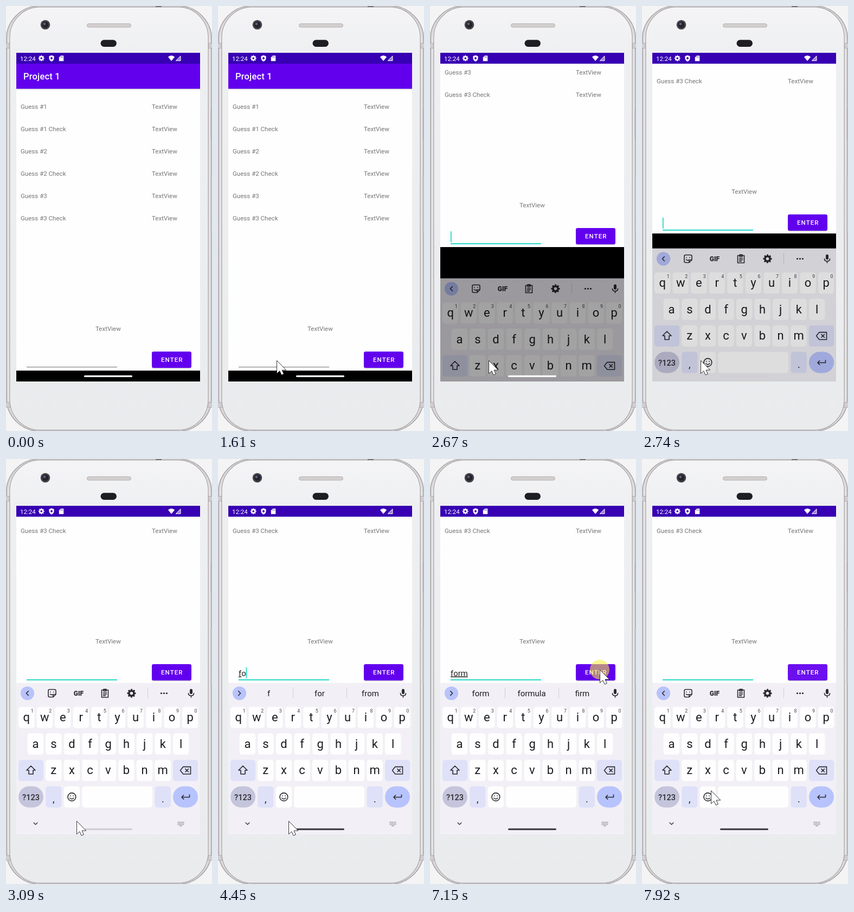
Recreate the animation shown at these times as an HTML page. Size 380x781 px, loop 7.99 s.

```html
<!DOCTYPE html>
<html lang="en">
<head>
<meta charset="utf-8">
<title>Guess the word</title>
<style>
  html, body { margin: 0; width: 100%; height: 100%; overflow: hidden; background: #f5f4f5; }
  svg { display: block; width: 100vw; height: 100vh; font-family: Roboto, sans-serif; }
  text { white-space: pre; }
  .label { font-size: 11.55px; fill: #757575; }
  .key { font-size: 22px; fill: #1c1b20; text-anchor: middle; }
  .hint { font-size: 9px; fill: #46464f; text-anchor: middle; }
  .word { font-size: 15px; fill: #1c1b20; text-anchor: middle; }
  .icon { fill: none; stroke: #2a2a30; stroke-width: 1.6; stroke-linecap: round; stroke-linejoin: round; }
</style>
</head>
<body>
<svg id="stage" viewBox="0 0 380 781" preserveAspectRatio="none"></svg>
<script>
const LOOP = 7990;
const stage = document.getElementById('stage');

const rect = (x, y, w, h, fill, r = 0, extra = '') =>
  `<rect x="${x}" y="${y}" width="${w}" height="${h}" rx="${r}" fill="${fill}" ${extra}/>`;
const circle = (x, y, r, fill, extra = '') => `<circle cx="${x}" cy="${y}" r="${r}" fill="${fill}" ${extra}/>`;
const text = (x, y, cls, s, extra = '') => `<text x="${x}" y="${y}" class="${cls}" ${extra}>${s}</text>`;
const icon = (x, y, d, extra = '') => `<path class="icon" transform="translate(${x} ${y})" d="${d}" ${extra}/>`;
const group = (id, body, extra = '') => `<g id="${id}" ${extra}>${body}</g>`;
const gear = (x, y, r, color) =>
  circle(x, y, r * .57, 'none', `stroke="${color}" stroke-width="${r * .45}"`) +
  circle(x, y, r * .83, 'none', `stroke="${color}" stroke-width="${r * .34}" pathLength="16" stroke-dasharray="1.1 .9" stroke-dashoffset=".5"`);

function phone() {
  const shell = (x, y, w, h, r, fill, stroke, sw) => rect(x, y, w, h, fill, r, `stroke="${stroke}" stroke-width="${sw}"`);
  const bands = [[0, 68], [0, 728], [372, 68], [372, 728]]
    .map(([x, y]) => rect(x, y, 8, 10, '#d2cdd0') + rect(x, y, 8, 1, '#b3aeb1') + rect(x, y + 9, 8, 1, '#b3aeb1')).join('');
  return `<defs>
      <linearGradient id="body" x2="0" y2="1"><stop stop-color="#f4f4f6"/><stop offset=".12" stop-color="#eeeff1"/><stop offset="1" stop-color="#e9ebed"/></linearGradient>
      <clipPath id="window">${rect(19, 106, 339, 584, '#000')}</clipPath>
    </defs>` +
    shell(.5, -.5, 379, 782, 62, '#e2dfe1', '#989396', 1.2) +
    shell(3, .8, 374, 779.5, 59, '#eceaec', '#c4c0c3', 1) +
    bands +
    shell(6.8, 1.8, 366.4, 777.5, 56, 'url(#body)', '#a5a0a3', 1.3) +
    rect(276, 0, 11, 2, '#77747a') +
    rect(378, 190, 2, 54, '#b5b1b4') + rect(378, 311, 2, 105, '#c0bcbf') +
    circle(72.5, 34.5, 8.8, '#48464c') + circle(72.5, 34.5, 6, '#242329') + circle(71, 33, 2.4, '#55607a') +
    rect(149.5, 32.5, 81, 6.5, '#d3cfcf', 3.2, 'stroke="#b5b0b0"') +
    rect(174.5, 62.3, 29.5, 12.6, '#1e1d23', 6.3);
}

function statusBar() {
  return rect(19, 86, 339, 20, '#3700b3') +
    `<text x="26" y="100.5" font-size="11.55" fill="#fff">12:24</text>` +
    gear(65.3, 96, 5.4, '#fff') +
    `<path d="M84 90.5L88.6 92.3V96Q88.4 100 84 102Q79.6 100 79.4 96V92.3Z" fill="#fff"/>
     <path d="M84 93.6L86.5 96L84 98.6L81.5 96Z" fill="#3700b3"/>
     <path d="M101 91.2H106.3V101.3H97.8V94.4Z" fill="#fff"/>
     <path d="M100.8 92.8V94.6M102.6 92.8V94.6M104.4 92.8V94.6" stroke="#3700b3" stroke-width=".8"/>
     <path d="M299 93.6Q305 88.4 311.2 93.6L305.1 101Z" fill="#fff"/>
     <path d="M313.2 100.6L322 91.8V100.6Z" fill="#9b80d9" stroke="#fff" stroke-width="1"/>`;
}

function app() {
  let rows = '';
  for (let i = 0; i < 6; i++) {
    const y = 189.1 + 41 * i;
    rows += text(27, y, 'label', `Guess #${(i >> 1) + 1}${i % 2 ? ' Check' : ''}`) + text(269, y, 'label', 'TextView');
  }
  return rect(19, 152, 339, 518, '#fefefe') +
    rect(19, 152, 339, 2.5, '#ebe9ee') + rect(19, 152, 339, 1, '#d3cfda') +
    rect(19, 106, 339, 46, '#6200ee') +
    `<text x="32" y="135" font-size="16.5" font-weight="500" letter-spacing=".2" fill="#fff">Project 1</text>` +
    rows + text(165, 596.7, 'label', 'TextView') +
    rect(38, 663, 167, 1, '#707070', 0, 'id="idleLine"') +
    rect(38, 662.9, 167, 1.8, '#12d3c3', 0, 'id="focusLine"') +
    `<text id="field" x="38" y="656.6" font-size="14.85" fill="#212121"><tspan id="composed" text-decoration="underline"></tspan><tspan id="fresh"></tspan></text>` +
    rect(38, 641, 1.6, 20, '#12d3c3', 0, 'id="caret"') +
    rect(269, 636, 73, 30.5, '#000', 3.5, 'opacity=".15"') +
    rect(269, 635, 73, 30, '#6200ee', 3.3) +
    rect(269, 635, 73, 30, '#fff', 3.3, 'id="ripple"') +
    `<text x="286" y="654.4" font-size="11.55" font-weight="500" letter-spacing="1.03" fill="#fff">ENTER</text>`;
}

function keyboard() {
  const PITCH = 33.55, SOFT = '#dee1f8';
  const key = (x, y, w = 29.3, fill = '#fefefe', r = 5) => rect(x, y - .2, w, 39, fill, r);
  const row = (letters, x0, y, hints) => [...letters].map((c, i) => {
    const x = x0 + PITCH * i;
    return key(x - 14.65, y) + text(x, y + 26.3, 'key', c) +
      (hints ? text(x + 10.5, y + 10.3, 'hint', (i + 1) % 10) : '');
  }).join('');
  const divider = x => rect(x, 420, 1, 20, '#cfcdd6');

  const tools =
    icon(39.5, 430.5, 'M1.8 -4L-2 0L1.8 4') +
    icon(85, 430.5, 'M-4.5 -7H4.5Q7 -7 7 -4.5V2L2 7H-4.5Q-7 7 -7 4.5V-4.5Q-7 -7 -4.5 -7ZM7 2H4Q2 2 2 4V7M-3 -2.5V-2M3 -2.5V-2M-3.5 1.5Q-1 4 1.5 2') +
    `<text x="134" y="434.8" font-size="12" font-weight="900" fill="#2a2a30" text-anchor="middle">GIF</text>` +
    icon(182.5, 430.5, 'M-6 -6H6V7.5H-6ZM-2.5 -7.5H2.5V-4H-2.5ZM-3 -1H3M-3 1.7H3M-3 4.4H1') +
    gear(231.5, 430.5, 8, '#2a2a30') + divider(261) +
    [-5, 0, 5].map(d => circle(291.5 + d, 430.5, 1.6, '#2a2a30')).join('');
  const words = icon(39.5, 430.5, 'M-1.8 -4L2 0L-1.8 4') + divider(138) + divider(237) +
    [93.5, 187.5, 281].map(x => text(x, 436, 'word', '')).join('');

  return rect(19, 411.5, 339, 370, '#f2f0f6') +
    circle(39.5, 430.5, 12.6, '#b8c3fb') + group('tools', tools) + group('words', words) +
    rect(339, 422.5, 5, 9.5, '#2a2a30', 2.5) + icon(341.5, 430.5, 'M-5 0Q-5 4.5 0 4.5Q5 4.5 5 0M0 4.5V7.5') +
    row('qwertyuiop', 37.7, 455.7, true) +
    row('asdfghjkl', 54.4, 504.3) +
    key(23, 553, 46, SOFT) + icon(46, 572, 'M0 -8L8 0H4V7H-4V0H-8Z') +
    row('zxcvbnm', 87.8, 553) +
    key(308, 553, 46, SOFT) + icon(331, 572.3, 'M-4 -6.7H9.5V6.7H-4L-9.5 0ZM0 -2.7L5.4 2.7M5.4 -2.7L0 2.7') +
    key(23, 601.7, 46, '#c4c5dc', 19.5) +
    `<text x="46" y="626.5" font-size="14.5" font-weight="500" fill="#2a2a30" text-anchor="middle">?123</text>` +
    key(73.2, 601.7, 29.3, SOFT) + text(87.8, 631, 'key', ',', 'style="font-size:18px"') +
    key(106.7, 601.7) + circle(121.4, 621, 7.4, 'none', 'stroke="#2a2a30" stroke-width="1.6"') +
    icon(121.4, 621, 'M-2.7 -2.2V-1.8M2.7 -2.2V-1.8M-3.6 2Q0 5.6 3.6 2') +
    key(140.2, 601.7, 129.8) +
    key(274.6, 601.7, 29.3, SOFT) + text(289.3, 631, 'key', '.', 'style="font-size:18px"') +
    key(308, 601.7, 46, '#b7c3fc', 19.5) + icon(331, 621.5, 'M7.5 -4.5V0H-7M-3.3 -3.7L-7 0L-3.3 3.7') +
    icon(54.5, 670, 'M-3.5 -1.7L0 1.7L3.5 -1.7', 'style="stroke-width:1.2"') +
    [-2.2, 0, 2.2].map(d => `<path d="M316.5 ${669.5 + d}H328.5" stroke="#77767e" stroke-width="1.2" stroke-dasharray="1.3 .8"/>`).join('') +
    `<path d="M320 674.2H325" stroke="#77767e"/>`;
}

stage.innerHTML = phone() + rect(19, 106, 339, 584, '#000') +
  `<g clip-path="url(#window)">${group('app', app())}${group('keyboard', keyboard())}</g>` +
  statusBar() + rect(144, 678.7, 89, 3.2, '#fff', 1.6, 'id="pill"') +
  circle(0, 0, 18, '#f6f03c', 'id="click" opacity=".56"') +
  `<path id="mouse" d="M.5 .5V24.4L5.8 19.6L9.2 27L13.4 25.2L10 18H17.8Z" fill="#fff" stroke="#222" stroke-width=".9"/>`;

const el = {};
stage.querySelectorAll('[id]').forEach(node => el[node.id] = node);
const wordSlots = el.words.querySelectorAll('text');

const show = (node, on) => node.setAttribute('visibility', on ? 'visible' : 'hidden');
const move = (node, x, y) => node.setAttribute('transform', `translate(${x} ${y})`);
const within = (t, spans) => spans.some(([a, b]) => t >= a && t < b);
// Last entry whose time has passed.
const latest = (t, list) => list.reduce((found, item) => t >= item[0] ? item : found, list[0]);

const easeOut = u => 1 - (1 - u) ** 2;
const easeBoth = u => u * u * (3 - 2 * u);

// Mouse strokes: quadratic curves drawn in a fixed number of jumps.
const strokes = [
  { from: 840, to: 1610, jumps: 11, x: [308, 200, 108], y: [754, 545, 651], ease: easeOut },
  { from: 2740, to: 3090, jumps: 5, x: [108, 121, 130], y: [651, 660, 665], ease: easeOut },
  { from: 5800, to: 6480, jumps: 9, x: [143, 375, 318], y: [639, 242, 378], ease: easeBoth },
  { from: 6680, to: 6880, jumps: 2, x: [318, 315, 313], y: [378, 383, 387], ease: easeOut },
  { from: 7360, to: 7920, jumps: 8, x: [313, 245, 127], y: [387, 480, 609], ease: easeBoth },
];
function mouseAt(t) {
  const s = strokes.filter(s => t >= s.from).pop();
  if (!s) return null;
  const u = s.ease(Math.min(s.jumps, Math.floor((t - s.from) / (s.to - s.from) * s.jumps + 1e-6)) / s.jumps);
  const curve = ([a, b, c]) => (1 - u) ** 2 * a + 2 * u * (1 - u) * b + u * u * c;
  return [curve(s.x), curve(s.y)];
}

// [time, app shift, keyboard shift, keyboard opacity]
const slide = [[0, 0, 280, 0], [2600, -104, 200, 0], [2670, -227, 89, .64],
  [2740, -252, 34, .87], [2810, -258, 8, .98], [2880, -258, 0, 1]];
// [time, composed text, fresh text]
const typing = [[0, '', ''], [3960, '', 'f'], [4100, 'f', ''], [4450, 'f', 'o'], [4520, 'fo', ''],
  [4590, 'fo', 'r'], [4730, 'for', ''], [5130, 'for', 'm'], [5400, 'form', ''], [7360, '', '']];
const suggestions = [[0, ''], [4170, 'f for from'], [4520, 'fo for following'],
  [4800, 'for form forum'], [5400, 'form formula firm'], [7430, '']];
const caretOn = [[2270, 2770], [3290, 3820], [3960, 5870], [6330, 6820], [7360, 7850]];
const clicks = [[2070, 2220], [7150, 7290]];

function pillColor(t) {
  if (t < 2740) return '#fff';
  const u = Math.min(1, Math.max(0, (t - 3220) / 1020));
  const mix = (a, b) => Math.round(a + (b - a) * u);
  return `rgb(${mix(208, 68)},${mix(206, 66)},${mix(212, 72)})`;
}

function render(t) {
  const [, appY, keysY, alpha] = latest(t, slide);
  move(el.app, 0, appY);
  move(el.keyboard, 0, keysY);
  el.keyboard.setAttribute('opacity', alpha);
  el.pill.setAttribute('fill', pillColor(t));

  const [, composed, fresh] = latest(t, typing);
  el.composed.textContent = composed;
  el.fresh.textContent = fresh;
  const width = composed || fresh ? el.field.getComputedTextLength() : 0;
  el.caret.setAttribute('x', 38 + width);
  show(el.caret, within(t, caretOn));
  show(el.idleLine, t < 2220);
  show(el.focusLine, t >= 2220);

  const list = latest(t, suggestions)[1];
  show(el.tools, !list);
  show(el.words, list);
  list.split(' ').forEach((word, i) => wordSlots[i].textContent = word);

  el.ripple.setAttribute('opacity', t < 7220 ? 0 : .22 - .16 * (t - 7220) / 700);

  const point = mouseAt(t);
  show(el.mouse, point);
  show(el.click, within(t, clicks));
  if (point) {
    move(el.mouse, ...point);
    move(el.click, ...point);
  }
}

const start = performance.now();
function tick() {
  render((performance.now() - start) % LOOP);
  requestAnimationFrame(tick);
}
tick();
</script>
</body>
</html>
```
